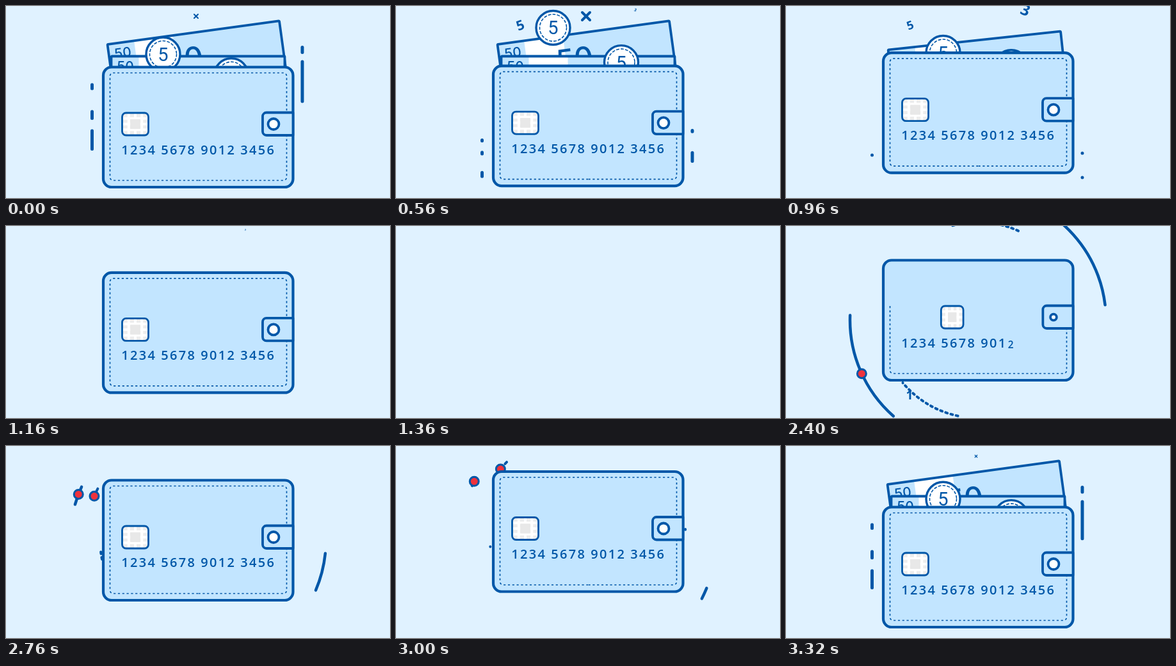
An HTML page with a canvas for the animation above (3360 ms loop, 600x300 px).

```html
<!DOCTYPE html>
<html lang="en">
<head>
<meta charset="utf-8">
<title>Wallet</title>
<style>
html, body { margin: 0; width: 100%; height: 100%; overflow: hidden; background: #e0f2ff; }
canvas { display: block; }
</style>
</head>
<body>
<canvas id="stage" width="600" height="300"></canvas>
<script>
const ctx = document.getElementById('stage').getContext('2d');
const LOOP = 3360, BG = '#e0f2ff', FILL = '#c2e5ff', INK = '#0057a8', RED = '#f0323c', RAD = Math.PI / 180;
let t = 0;

// Progress from 0 to 1 of a move that begins at `start` and takes `time` ms.
const linear = (start, time) => Math.max(0, Math.min(1, (t - start) / time));
const ease = (start, time) => { const p = linear(start, time); return p * p * (3 - 2 * p); };
const easeIn = (start, time) => linear(start, time) ** 2;
const easeOut = (start, time) => 1 - (1 - linear(start, time)) ** 3;
const pulse = (on, off, time) => ease(on, time) - ease(off, time);
const mix = (a, b, p) => a + (b - a) * p;

function paint(fill, width, dash = []) {
  if (fill) { ctx.fillStyle = fill; ctx.fill(); }
  ctx.setLineDash(dash);
  ctx.lineWidth = width;
  ctx.strokeStyle = INK;
  if (width) ctx.stroke();
  ctx.setLineDash([]);
}

function circle(x, y, r, fill, width, dash) {
  if (r <= 0) return;
  ctx.beginPath();
  ctx.arc(x, y, r, 0, 7);
  paint(fill, width, dash);
}

function box(x, y, w, h, r, fill, width) {
  ctx.beginPath();
  ctx.roundRect(x, y, w, h, r);
  paint(fill, width);
}

function segment(x1, y1, x2, y2, width) {
  if (width <= 0) return;
  ctx.beginPath();
  ctx.moveTo(x1, y1);
  ctx.lineTo(x2, y2);
  paint(null, width);
}

function label(text, x, y, font, align = 'center') {
  ctx.font = font;
  ctx.textAlign = align;
  ctx.fillStyle = INK;
  ctx.fillText(text, x, y);
}

function place(x, y, angle, scale, draw) {
  if (scale <= 0) return;
  ctx.save();
  ctx.translate(x, y);
  ctx.rotate(angle * RAD);
  ctx.scale(scale, scale);
  draw();
  ctx.restore();
}

const sign = (text, x, y, angle, size, scale) => place(x, y, angle, scale,
  () => label(text, 0, size * .357, `700 ${size}px "Open Sans", sans-serif`));

// Everything in orbit slows down exponentially towards its end angle.
const orbitAngle = (end, left) => end - left * Math.exp((2400 - t) / 200);

function orbit(r, end, headLeft, tailLeft, width, dash) {
  const head = orbitAngle(end, headLeft);
  const tail = mix(head, orbitAngle(end, Math.min(tailLeft, headLeft + 300)), ease(2040, 320));
  if (head - tail < .4) return;
  ctx.beginPath();
  ctx.arc(300, 147, r, tail * RAD, head * RAD);
  ctx.lineDashOffset = tail * RAD * r;
  paint(null, width, dash);
  ctx.lineDashOffset = 0;
}

function satellite(r, end, left) {
  const angle = orbitAngle(end, left) * RAD, scale = pulse(2280, 3000, 120);
  circle(300 + r * Math.cos(angle), 147 + r * Math.sin(angle), 7 * scale, RED, 3 * scale);
}

function drawOrbits() {
  if (t < 2040 || t > 3140) return;
  const dash = [3, 5.5];
  orbit(200, 29, 36, 140, 4.5);
  orbit(200, 209, 27, 78, 4.5);
  orbit(153, -3, 62, 103, 4, dash);
  orbit(153, 180, 40, 79, 4, dash);
  orbit(176, 231, 145, 170, 4);
  satellite(200, 210, 55);
  satellite(176, 226, 140);
  sign('1', 193, 264.5, 0, 20, pulse(2280, 2560, 140));
}

// A streak grows, then slides down to `end` while shortening to a dot.
function streak(x, y, length, end, off) {
  const slide = ease(3360, 800);
  const top = mix(y, end, slide);
  segment(x, top, x, top + length * ease(3120, 240) * (1 - slide) + .01, 5 * pulse(3140, off, 120));
}

function drawStreaks() {
  streak(134.5, 123, 6, 233, 4330);
  streak(134.5, 165, 10.5, 246, 4160);
  streak(134.5, 195, 28.5, 278, 4160);
  streak(463, 64.5, 8, 230, 4330);
  streak(463, 87, 62, 268, 4330);
}

function drawSigns() {
  place(297, 16, 0, pulse(3220, 3940, 280), () => {
    segment(-6, -6, 6, 6, 4);
    segment(-6, 6, 6, -6, 4);
  });
  sign('5', 194, 30, -20, 21, pulse(3480, 4260, 260));
  sign('3', 374, 6, 22, 24, pulse(3840, 4340, 240));
}

function bill(stripe) {
  box(0, 0, 271, 85, 1, FILL, 0);
  ctx.fillStyle = '#fff';
  ctx.fillRect(stripe, 0, 61, 85);
  label('50', 9, 23.5, '500 21px Inter, sans-serif', 'left');
  label('50', 88, 55, '500 46px Inter, sans-serif', 'left');
  box(0, 0, 271, 85, 1, null, 3.8);
}

// A tossed coin follows a parabola around its peak.
function coin(x, peak, peakTime, gravity) {
  const y = peak + gravity * ((t - peakTime) / 1000) ** 2;
  circle(x, y, 26.5, '#fff', 3.4);
  circle(x, y, 21, null, 1.6, [3.5, 3.5]);
  label('5', x, y + 10.5, '400 29px Roboto, sans-serif');
}

function drawMoney() {
  if (t < 3010 || t > 4500) return;
  const out = ease(3040, 200) - ease(4160, 500);
  place(mix(163, 158.5, out), mix(95, 60, out), mix(-1, -7.8, out), 1, () => bill(42));
  place(164.5, mix(113, 78.5, out), 0, 1, () => bill(43));
  coin(245.5, 33, 3848, 179);
  coin(352, 88, 3963, 56);
}

function drawStitches() {
  const length = 444 * ease(2080, 600);
  const bottom = Math.min(138, length), side = Math.max(0, Math.min(168, length - 138));
  const top = Math.max(0, length - 306);
  // Two mirrored halves grow from the middle of the lower edge.
  for (const dir of [-1, 1]) {
    ctx.save();
    ctx.translate(300.5, 0);
    ctx.scale(dir, 1);
    ctx.beginPath();
    ctx.rect(0, 172, bottom + 1, 8);
    ctx.rect(130, 178 - side, 10, side);
    ctx.rect(139 - top, 7, top, 8);
    ctx.clip();
    ctx.beginPath();
    ctx.moveTo(0, 177);
    ctx.arcTo(138, 177, 138, 9, 5);
    ctx.arcTo(138, 9, 0, 9, 5);
    ctx.lineTo(0, 9);
    paint(null, 1.7, [3.2, 3.6]);
    ctx.restore();
  }
}

function drawChip() {
  const w = 41 * ease(2160, 320), h = 35 * ease(2160, 220);
  if (w < 1) return;
  ctx.save();
  ctx.translate(mix(300, 202, ease(2260, 320)), 89);
  ctx.save();
  ctx.beginPath();
  ctx.roundRect(-w / 2, -h / 2, w, h, 6);
  ctx.clip();
  ctx.fillStyle = '#ededed';
  ctx.fillRect(-w / 2, -h / 2, w, h);
  ctx.fillStyle = '#fff';
  for (const p of [-.25, 0, .25]) {
    ctx.fillRect(-w / 2, h * p - 2, w, 4);
    ctx.fillRect(w * p - 2, -h / 2, 4, h);
  }
  ctx.fillStyle = '#e8e8e8';
  ctx.fillRect(-w * .19, -h * .22, w * .38, h * .44);
  ctx.restore();
  box(-w / 2, -h / 2, w, h, 6, null, 2.8);
  ctx.restore();
}

function drawDigits() {
  [...'1234567890123456'].forEach((digit, i) => {
    const p = linear(1935 + 40 * i, 60);
    if (!p) return;
    const x = 186 + Math.floor(i / 4) * 62 + (i % 4) * 13.7;
    place(x, 136 + 2 * (1 - p), 0, mix(.6, 1, p),
      () => label(digit, 0, 0, '600 20px "Open Sans", sans-serif'));
  });
}

function drawWallet() {
  const top = 306 - 252.5 * easeOut(1880, 360) - 13.5 * ease(2760, 240)
    + 55.5 * ease(3010, 230) - 31 * ease(3800, 800) + 250 * easeIn(4480, 235);
  ctx.save();
  ctx.translate(0, top);
  box(152, 0, 296.5, 187.5, 13, FILL, 4.2);
  drawStitches();
  const left = mix(448.5, 401, easeOut(2160, 300));
  box(left, 71, 448.5 - left, 35.5, [6, 0, 0, 6], FILL, 3.8);
  circle(418, 89, 8.5 * ease(2280, 220), '#fff', 3.8);
  drawChip();
  drawDigits();
  ctx.restore();
}

function frame(now) {
  const phase = now % LOOP;
  // The story starts with the wallet's entrance and ends on an empty stage.
  t = phase < 1900 ? phase + LOOP : phase;
  ctx.fillStyle = BG;
  ctx.fillRect(0, 0, 600, 300);
  ctx.lineCap = ctx.lineJoin = 'round';
  if (t < 4715) {
    drawOrbits();
    drawStreaks();
    drawSigns();
    drawMoney();
    ctx.lineCap = 'butt';
    drawWallet();
  }
}

const start = performance.now();
(function tick() {
  frame(performance.now() - start);
  requestAnimationFrame(tick);
})();
</script>
</body>
</html>
```
